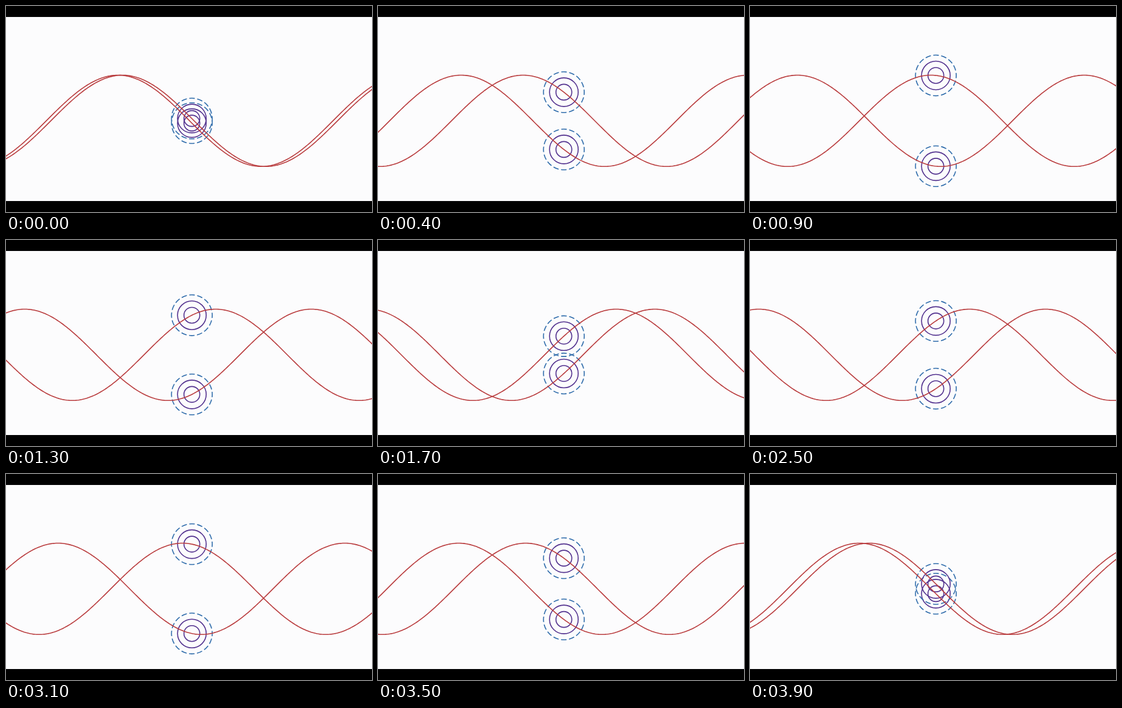
Animation, 600 px wide and 338 px high, one loop 4 s. Source, as an HTML page with a canvas:

```html
<!DOCTYPE html>
<html lang="en">
<head>
<meta charset="utf-8">
<title>Opposed waves</title>
<style>
  html, body { margin: 0; height: 100%; overflow: hidden; background: #000; }
  canvas { display: block; }
</style>
</head>
<body>
<canvas width="600" height="338"></canvas>
<script>
const ctx = document.querySelector('canvas').getContext('2d');
const TAU = Math.PI * 2;
const LOOP = 4000, STEP = 100;
const MID = 188.4, AMP = 74.9, LENGTH = 470;
const NODE = 187.2;                  // crest position when both waves coincide
const RING_X = NODE + LENGTH / 4;
const DASH_RADIUS = 33.4, DASHES = 16;

const waveY = (x, phase) => MID - AMP * Math.cos((x - NODE) / LENGTH * TAU - phase);

function ring(y, radius, color) {
  ctx.strokeStyle = color;
  ctx.beginPath();
  ctx.arc(RING_X, y, radius, 0, TAU);
  ctx.stroke();
}

function target(y) {
  const period = DASH_RADIUS * TAU / DASHES, dash = period * 0.69;
  ctx.setLineDash([dash, period - dash]);
  ctx.lineDashOffset = dash / 2;
  ring(y, DASH_RADIUS, '#2f6cab');
  ctx.setLineDash([]);
  ring(y, 23.5, '#53328f');
  ring(y, 13, '#53328f');
}

function wave(phase) {
  ctx.strokeStyle = '#b93c3e';
  ctx.beginPath();
  for (let x = -2; x <= 602; x += 2) ctx.lineTo(x, waveY(x, phase));
  ctx.stroke();
}

function draw(now) {
  const time = Math.floor((now % LOOP + 0.5) / STEP) * STEP;
  const phase = 0.05 + time / LOOP * TAU;
  ctx.fillStyle = '#000';
  ctx.fillRect(0, 0, 600, 338);
  ctx.fillStyle = '#fcfcfd';
  ctx.fillRect(0, 18, 600, 302);
  ctx.lineWidth = 1.6;
  for (const p of [phase, -phase]) target(waveY(RING_X, p));
  for (const p of [phase, -phase]) wave(p);
  requestAnimationFrame(draw);
}
draw(0);
</script>
</body>
</html>
```
